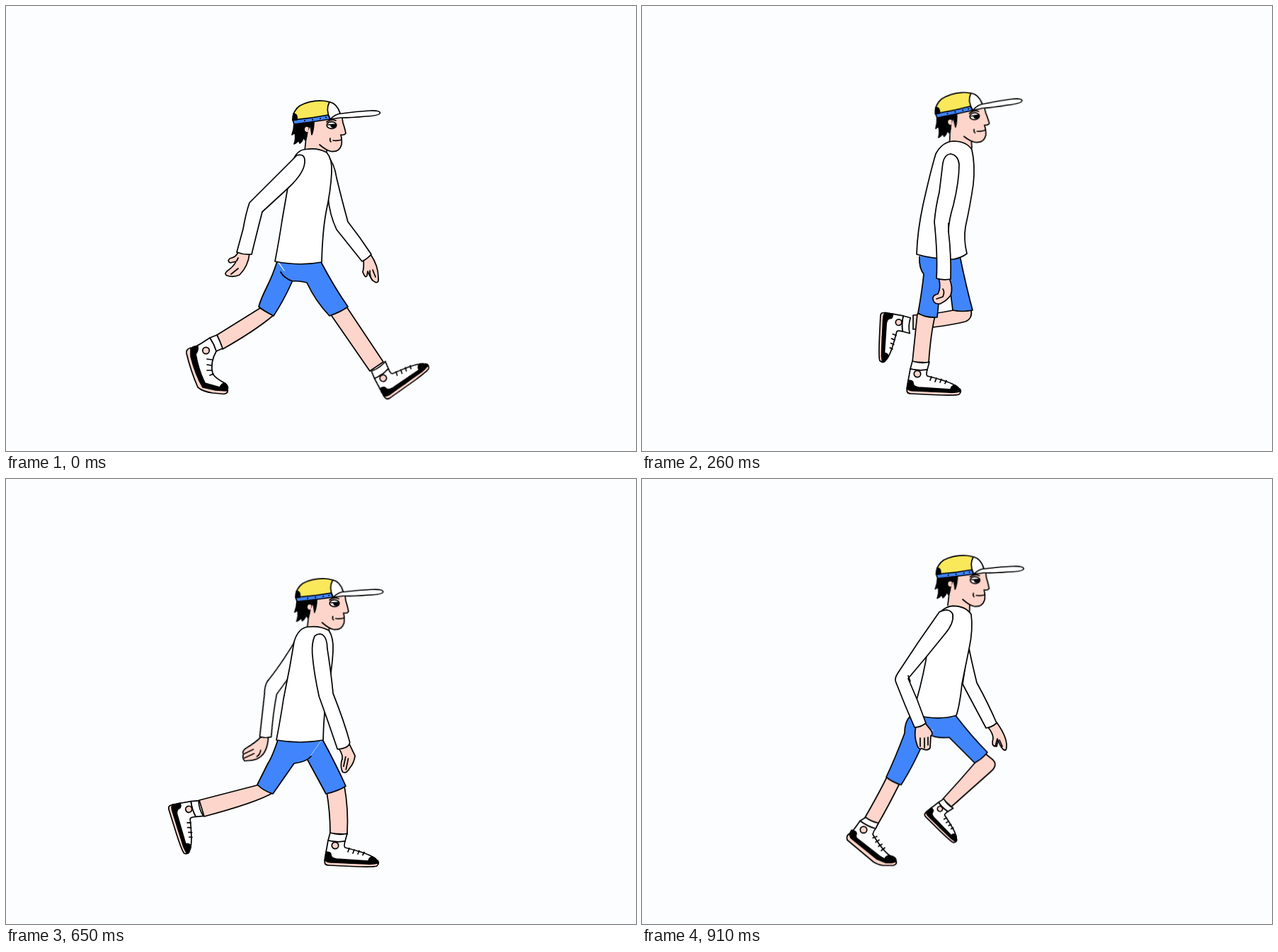
Animation, 890 px wide and 629 px high, one loop 1.04 s. Source, as an HTML page:

```html
<!DOCTYPE html>
<html lang="en">
<head>
<meta charset="utf-8">
<title>Walk cycle</title>
<style>
html, body { margin: 0; width: 100%; height: 100%; overflow: hidden; background: #fbfdff; }
svg { display: block; width: 890px; height: 629px; }
path, circle, ellipse { stroke: #000; stroke-width: 1.7; stroke-linejoin: round; stroke-linecap: round; vector-effect: non-scaling-stroke; }
.pose { opacity: 0; }
</style>
</head>
<body>
<svg id="stage" viewBox="0 0 890 629"></svg>
<script>
const SKIN = '#fdd5ca', BLUE = '#4085fc', YELLOW = '#f9e85a', WHITE = '#fff', INK = '#000';
const STEP = 130, COUNT = 8;

const path = (d, fill = 'none', extra = '') => `<path d="${d}" fill="${fill}" ${extra}/>`;
const flat = (d, fill) => path(d, fill, 'style="stroke:none"');
const group = (transform, body) => `<g transform="${transform}">${body}</g>`;

const SHOES = {
  // local coordinates, ankle at the origin
  straight: {
    sock: 'M-9 -10L-12 1Q0 4 12 2L15 -9Q4 -6 -9 -10Z',
    sole: 'M-16 27Q-19 36 -11 36L20 37.5Q52 39 57 37Q61 33 58 29Z',
    upper: 'M-12 1Q-14 12 -17 29L20 33L58 33Q58 27 49 23Q40 18 12 11Q10 9 12 2Q0 4 -12 1Z',
    black: 'M-15 17Q-8 17 -8 21Q-8 26 0 27L45 30Q46 24 51 24Q59 29 58 33Q50 35 40 34L-5 32Q-17 32 -16 27Z',
    laces: 'M18 12L16 17M25 14L23 19M32 15.5L30 20M39 17.5L37 21.5',
    eyelet: [-2, 8]
  },
  // heel up, toes bent against the ground
  pushing: {
    sock: 'M288 469L298 465Q303 475 306 484L297 488Q294 478 288 469Z',
    sole: 'M261 483Q254 485 255 491Q261 516 271 539Q278 545 292 547L308 548.5Q315 547 313 542L280 530Z',
    upper: 'M288 469Q275 478 263 484L265 505L279 537L312 543Q315 538 309 533Q297 527 292 520Q288 504 297 488Q294 478 288 469Z',
    black: 'M261 485Q264 480 271 481Q272 487 268 492Q272 515 281 533L302 539Q305 533 309 533Q316 538 312 544L296 543L278 539Q267 520 261 495Z',
    laces: 'M284 499L291 500M284 507L290 508M284 515L291 515M288 522L293 520',
    eyelet: [282.5, 487]
  },
  rolling: {
    sock: 'M317 484Q325 490 335 492L331 500Q320 497 309 489Z',
    sole: 'M294 507Q289 510 291 516L328 547Q334 551 342 552L356 552Q362 550 360 546L335 540Z',
    upper: 'M309 489Q302 500 294 508L335 543L359 547Q361 542 351 538Q341 531 327 508Q328 503 331 500Q320 497 309 489Z',
    black: 'M294 508L297 502Q304 503 304 507Q302 511 305 514L337 539L344 543Q345 538 351 538Q361 540 360 546Q355 549 345 548L333 543L296 513Z',
    laces: 'M327 513L333 511M331 519L336 516M335 525L340 522M339 531L344 527',
    eyelet: [314, 501.5]
  }
};

function shoe([kind, x, y, turn = 0, size = 1]) {
  const s = SHOES[kind], [cx, cy] = s.eyelet;
  return group(`translate(${x} ${y}) rotate(${turn}) scale(${size})`,
    path(s.sock, WHITE) + path(s.sole, SKIN) + path(s.upper, WHITE) + path(s.black, INK, 'stroke-width="1"') +
    path(s.laces) + `<circle cx="${cx}" cy="${cy}" r="4.7" fill="${SKIN}"/>`);
}

function makeHead() {
  return flat('M426 165V184L421 214H453V204Q464 208 470 203Q476 198 474 183L480 180L475 162L468 156Z', SKIN) +
    path('M424 186L422 205M453 204.500V213') +
    path('M443 196Q452 204 459 205.500Q471 207 474 196Q475 190 473 182Q478 183 480 180Q479 174 476 165L475 159') +
    path('M462 190Q468 191 474 189M458 187Q457 190 459 192M453 164Q459 159 466 162') +
    `<ellipse cx="460" cy="168.500" rx="6.800" ry="4.800" fill="${WHITE}"/>` +
    path('M455 168L466 167Q466 171 462 171.500Q459 171 459 168', INK) +
    path('M407 165Q407 174 404 182L408 179Q410 187 407 195Q412 193 413 189L415 194Q419 191 420 186L423 190Q426 183 425 178L430 168L432 182Q435 174 435 162Z', INK, 'stroke-width="1"') +
    path('M428 171Q422 168 421 174Q421 179 426 179', SKIN) +
    path('M405 161Q405 148 415 141Q430 133 447 134Q467 135 472 152L457 160Z', YELLOW) +
    path('M457 135.500Q468 138 472 152L458 160Q451 147 457 135.500Z', WHITE) +
    path('M405 161Q430 159 455 154L458 160Q432 164 407 167Z', BLUE) +
    path('M406 152Q412 152 411 161L405 161.500Z', INK) +
    path('M422 162V162M433 160.700V160.700M444 159V159M452 157.500V157.500', 'none', 'style="stroke-width:2.200"') +
    path('M458 160Q466 152 474 152Q495 149 514 148Q528 147.500 528.500 151Q528 155 508 156Q488 158 472 158Z', WHITE);
}
const HEAD = makeHead();

// The stance leg is on the near side in the first half of the loop, the swing leg in the second.
const PHASES = [
  { // contact
    head: [0, 0, 0], shift: [1, -2.7],
    torso: 'M380 361Q386 330 390 303L398 257L404 222Q410 203 424 202.500Q440 200 453 207Q461 216 460 235Q459 260 452 292Q447 320 446 362Q415 368 380 361Z',
    hip: 'M384 360H445L427 389H404Z',
    stance: {
      calf: 'M458 435L514 516L533 503L481 425Z', shoe: ['straight', 529.5, 518.5, -38],
      line: 'M444 360Q464 398 483 425Q474 432 457 438', far: 'L427 391', near: 'Q437 417 425 391Q412 388 405 389Q393 385 388 376'
    },
    swing: {
      calf: 'M359 427L298 465L306 485Q352 459 378 437Z', shoe: ['pushing', 0, 0],
      line: 'M383 361Q377 380 369 396Q360 414 357 425Q364 431 378 438', far: 'Q392 417 404 390', near: 'Q395 415 407 396Q425 394 431 386'
    }
  },
  { // down
    head: [4, 9, 1], shift: [0, -2],
    torso: 'M382 371Q388 340 392 313L401 267L407 232Q413 212 427 211Q444 209 456 216Q463 226 462 245Q461 270 454 302Q449 330 448 371Q417 377 382 371Z',
    hip: 'M385 369H447L427 397H404Z',
    stance: {
      calf: 'M453 444Q458 473 458 503L482 504Q484 468 478 436Z', shoe: ['straight', 467, 512],
      line: 'M447 370Q466 405 480 436Q470 443 452 447', far: 'L426 399', near: 'L426 400Q404 399 390 386'
    },
    swing: {
      calf: 'M358 434L273 456L280 479Q355 459 378 445Z', shoe: ['straight', 266, 468, 70, .95],
      line: 'M384 371Q376 395 370 404L355 434Q364 443 377 447', far: 'L404 399', near: 'L407 404Q424 402 431 394'
    }
  },
  { // passing
    head: [10, -12, -4], shift: [-1, -2],
    torso: 'M388 351Q389 318 397 281Q408 232 415 209Q424 192 440 191Q458 191 466 203Q471 225 468 252Q464 280 457 312Q454 330 459 350Q451 356 440 358Q412 358 388 351Z',
    hip: 'M393 353H449L442 392L399 384Z',
    stance: {
      calf: 'M389 435L382 503L405 504Q408 462 414 438Z', shoe: ['straight', 391, 512],
      line: 'M392 354Q391 370 398 379Q396 400 390 434Q400 441 417 440', far: 'L421 400L430 388', near: 'L421 400L430 388'
    },
    swing: {
      calf: 'M440 430Q411 436 383 437V457Q430 453 457 446Q467 442 465 430Z', shoe: ['straight', 370, 449, 90, .92],
      line: 'M449 353Q458 397 467 430Q452 433 439 430', far: 'L434 390', near: 'L434 390L419 389Q399 385 393 367L392 356'
    }
  },
  { // up
    head: [11.5, -20, 1], shift: [-1, -5.7],
    torso: 'M383 338Q395 300 402 262Q408 222 413 209Q422 187 440 185Q458 185 466 197Q469 218 463 246L453 295Q450 325 445 340Q418 348 383 338Z',
    hip: 'M384 338H444L425 358L408 361Z',
    stance: {
      calf: 'M347 427Q333 455 315 486L334 494Q348 470 365 436Z', shoe: ['rolling', 0, 0],
      line: 'M384 338Q372 345 372 365Q358 402 346 427Q354 434 367 438', far: 'Q384 412 402 370', near: 'Q387 408 408 361Q422 357 427 348'
    },
    swing: {
      calf: 'M473 405Q450 432 426 458L438 469L493 420Q505 410 496 402L486 394Z', shoe: ['straight', 427.3, 468.4, 42, .78],
      line: 'M444 340Q467 370 489 392Q482 401 471 407', far: 'L420 357', near: 'L435 371Q418 373 404 366'
    }
  }
];

// Each arm is a sleeve with a hand.
const ARMS = {
  backNear: [
    'M411 211Q377 245 344 278Q339 292 335 315L326 348Q336 352 347 351Q355 318 362 291L400 256Q421 236 422 221Q423 208 411 211Z',
    'M328 347Q326 355 316 357Q312 361 317 363L325 361Q322 368 312 375Q308 379 312 381Q321 384 330 380Q342 368 344 350Z', 'M328 371L318 379M326 360L328 356'],
  frontFar: [
    'M453 210Q464 222 467 243Q475 276 483 305Q501 328 516 351Q511 357 503 361L467 316Q457 295 455 270Z',
    'M505 358Q506 369 504 376Q508 386 510 381L511 375Q516 388 521 390Q527 393 526 384Q526 367 515 351Z', 'M514 374Q514 384 518 388M518 373L522 383'],
  frontNear: [
    'M434 215Q439 210 445 212Q452 216 454 230Q464 263 471 292Q492 329 504 357Q504 366 488 369Q469 331 452 299Q440 267 434 240Q431 225 434 215Z',
    'M489 367Q499 377 496 386Q496 396 500 400Q506 402 509 393Q514 385 514 375L504 360Z', 'M501 378L500 392M505 380L504 396'],
  backFar: [
    'M407 217Q379 249 357 268Q352 274 350 285L333 343Q341 347 349 346Q357 314 367 288L400 256Z',
    'M334 344Q326 350 310 356Q304 360 306 363Q303 369 306 373Q322 375 327 372Q340 367 345 345Z', 'M307 363L321 359M306 369L321 365M324 370Q329 368 331 362'],
  downNear: [
    'M425 222Q427 210 436 209Q447 211 448 224Q448 248 440 281Q433 304 433 319Q437 352 436 386Q426 388 416 385Q418 353 413 305Q415 283 420 263Z',
    'M419 384Q423 398 418 407Q410 409 411 414Q412 422 421 421Q430 417 436 409Q440 398 434 385Z', 'M416 414L425 411Q428 404 425 400M433 307V319'],
  downNear2: [
    'M423 228Q425 216 434 215Q445 216 446 230Q445 256 438 287L432 318Q436 352 436 385Q426 387 416 384Q418 351 412 302Q414 282 419 262Z',
    'M418 383Q423 397 418 404Q411 407 411 411Q412 420 421 419Q430 415 436 407Q439 398 434 384Z', 'M416 412L424 409Q427 404 425 399'],
  liftFront: [
    'M432 207Q437 199 444 200Q452 202 454 215Q466 257 474 292Q489 320 502 350Q495 356 486 357Q471 327 452 293Q442 259 438 237Q430 216 432 207Z',
    'M488 355Q494 364 492 378Q482 385 484 390Q482 397 488 398Q497 397 503 384Q509 371 502 352Z', 'M485 389L492 383M486 394L493 388'],
  liftBackFar: [
    'M417 198Q386 239 360 284Q357 289 362 297Q371 318 380 342L392 337L377 292Q392 274 405 251Z', '', ''],
  liftBack: [
    'M420 188Q434 181 439 191Q441 204 428 219L402 251L376 282Q390 313 401 345Q394 351 385 351Q371 319 359 288Q356 283 361 275Q390 230 420 188Z',
    'M387 349Q384 363 388 374Q390 383 395 381Q404 385 407 380L408 363Q412 361 408 355L400 345Z', 'M393 366V378M399 366V380M404 365V376M376 278L379 286'],
  liftFrontFar: [
    'M461 235Q467 264 473 288Q489 317 501 345Q494 351 486 352L453 290Z',
    'M488 350Q496 359 496 367Q493 377 499 378L502 367Q506 378 510 382Q515 386 515 378Q516 365 501 344Z', 'M505 369L509 378M499 377L501 378L503 370']
};

const SWING_BACK = 'translate(2 9) rotate(-10 415 215)';
const SWING_FRONT = 'translate(2 9) rotate(8 450 215)';
const ARM_STEPS = [
  { near: ['backNear'], far: ['frontFar'] },
  { near: ['backNear', SWING_BACK], far: ['frontFar', SWING_FRONT] },
  { near: ['downNear'] },
  { near: ['liftFront'], far: ['liftBackFar'] },
  { near: ['frontNear'], far: ['backFar'] },
  { near: ['frontNear', SWING_FRONT], far: ['backFar', SWING_BACK] },
  { near: ['downNear2'] },
  { near: ['liftBack'], far: ['liftFrontFar'] }
];

function arm(entry) {
  if (!entry) return '';
  const [name, transform = ''] = entry, [sleeve, hand, lines] = ARMS[name];
  return group(transform, path(hand, SKIN) + path(sleeve, WHITE) + path(lines));
}

const leg = (part, side) => path(part.calf, SKIN) + shoe(part.shoe) + path(part.line + part[side], BLUE);

function pose(i) {
  const phase = PHASES[i % 4], second = i >= 4, arms = ARM_STEPS[i];
  const [near, far] = second ? [phase.swing, phase.stance] : [phase.stance, phase.swing];
  const [hx, hy, turn] = phase.head;
  const body = flat(phase.hip, BLUE) + leg(far, 'far') + leg(near, 'near') +
    group(`translate(${hx} ${hy}) rotate(${turn} 450 170)`, HEAD) + path(phase.torso, WHITE);
  const shift = second ? phase.shift : [0, 0];
  return `<g class="pose">${arm(arms.far)}${group(`translate(${shift})`, body)}${arm(arms.near)}</g>`;
}

const stage = document.getElementById('stage');
stage.innerHTML = Array.from({ length: COUNT }, (_, i) => pose(i)).join('');

const duration = STEP * COUNT;
stage.querySelectorAll('.pose').forEach((el, i) => el.animate([
  { opacity: 1, easing: 'step-end' },
  { opacity: 0, offset: 1 / COUNT, easing: 'step-end' },
  { opacity: 0 }
], { duration, delay: i * STEP - duration, iterations: Infinity }));
</script>
</body>
</html>
```
